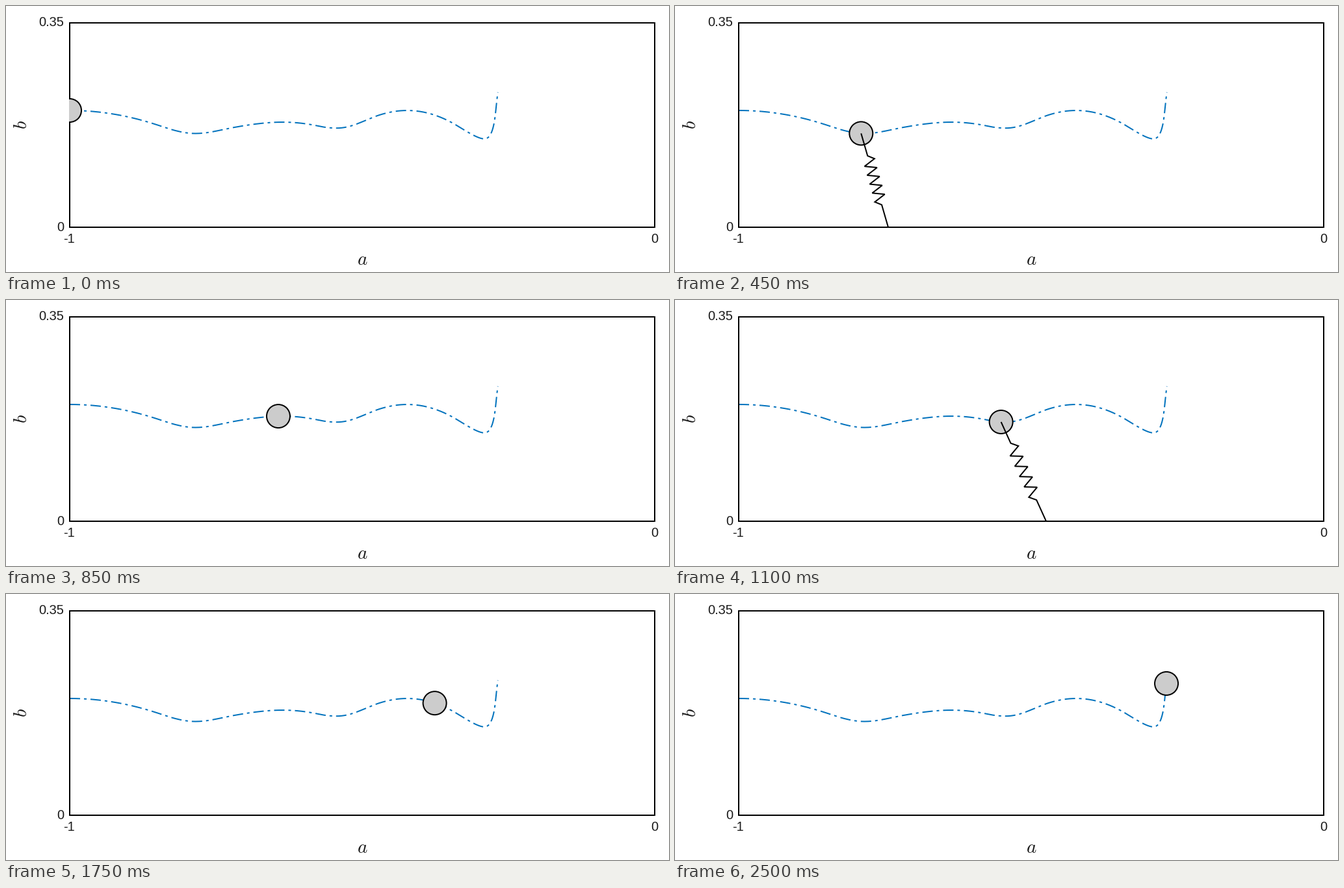
Write a matplotlib script that moves like this. It is 1020 px wide and 410 px high and loops after 2550 ms.

```python
import numpy as np
import matplotlib.pyplot as plt
from matplotlib.animation import FuncAnimation
from matplotlib.patches import Circle, Rectangle

plt.rcParams["mathtext.fontset"] = "cm"

WIDTH, HEIGHT, DPI = 1020, 410, 100
PX = 72 / DPI                      # points per pixel
FRAMES, INTERVAL = 51, 50
LEFT, RIGHT, TOP, GROUND = 98, 998, 26, 341
RADIUS, ROD, COIL, TURNS = 18, 36, 9, 10
LINE = 2 * PX
BLACK, INK, BLUE, GREY = "#000000", "#1a1a1a", "#0072bd", "#cccccc"

# Hopper states: time in frames, x, y, vx, vy (pixels, y downwards)
STATES = np.array([
    [0.00, 98.0, 161.0, 21.15, 0.00],
    [6.62, 238.0, 185.1, 21.15, 7.28],    # touchdown
    [9.25, 291.0, 196.5, 18.60, 0.00],
    [12.50, 344.5, 188.3, 16.30, -3.10],
    [16.33, 407.7, 179.6, 16.80, -1.13],  # lift-off
    [20.69, 480.9, 185.1, 16.80, 3.66],   # touchdown
    [22.50, 509.0, 188.2, 14.40, 0.00],
    [27.00, 566.0, 171.0, 11.70, -4.40],
    [29.65, 596.5, 162.7, 11.80, -1.91],  # lift-off
    [38.01, 695.1, 185.1, 11.80, 7.28],   # touchdown
    [42.40, 736.1, 204.8, 6.20, 0.00],
    [47.60, 753.2, 163.8, 1.20, -12.10],  # lift-off
    [50.55, 756.7, 132.9, 1.20, -8.86],
])
# Stance phases: touchdown time, lift-off time, foot x
STANCES = [(6.62, 16.33, 328), (20.69, 29.65, 571), (38.01, 47.60, 785)]


def position(t):
    """Cubic Hermite interpolation of the hopper's centre."""
    t = np.atleast_1d(t)
    i = np.clip(np.searchsorted(STATES[:, 0], t, side="right") - 1,
                0, len(STATES) - 2)
    a, b = STATES[i], STATES[i + 1]
    span = (b[:, 0] - a[:, 0])[:, None]
    s = (t[:, None] - a[:, :1]) / span
    return ((1 + 2 * s) * (1 - s) ** 2 * a[:, 1:3]
            + s * (1 - s) ** 2 * span * a[:, 3:]
            + s ** 2 * (3 - 2 * s) * b[:, 1:3]
            + s ** 2 * (s - 1) * span * b[:, 3:])


def spring(top, foot):
    """Leg polyline: rod, zigzag of fixed width, rod."""
    length = np.hypot(*(foot - top))
    along = (foot - top) / length
    across = np.array([along[1], -along[0]])
    steps = np.linspace(ROD, length - ROD, TURNS + 2)
    offsets = np.zeros(TURNS + 2)
    offsets[1:-1:2] = COIL
    offsets[2:-1:2] = -COIL
    coil = top + steps[:, None] * along + offsets[:, None] * across
    return np.vstack([top, coil, foot])


# The small margin keeps the pixel size from being rounded down.
fig = plt.figure(figsize=((WIDTH + 0.01) / DPI, (HEIGHT + 0.01) / DPI),
                 dpi=DPI, facecolor="white")
ax = fig.add_axes([0, 0, 1, 1])
ax.set_xlim(0, WIDTH)
ax.set_ylim(HEIGHT, 0)
ax.axis("off")

track = position(np.linspace(0, STATES[-1, 0], 600))
ax.plot(*track.T, color=BLUE, lw=LINE, ls=(0, (8, 3, 2, 3)),
        dash_capstyle="butt", zorder=1)
ax.add_patch(Rectangle((LEFT, TOP), RIGHT - LEFT, GROUND - TOP, fill=False,
                       ec=BLACK, lw=LINE, zorder=2))

for x, y, label, align in [(89, 31, "0.35", "right"), (89, 347, "0", "right"),
                           (97, 365, "-1", "center"), (998, 365, "0", "center")]:
    ax.text(x, y, label, ha=align, va="baseline", color=INK,
            family="Liberation Sans", size=20 * PX)
for x, y, label, angle in [(548, 399, "$a$", 0), (32, 183, "$b$", 90)]:
    ax.text(x, y, label, ha="center", va="baseline", color=INK, size=29 * PX,
            rotation=angle, rotation_mode="anchor")

ball = ax.add_patch(Circle((LEFT, 161), RADIUS, fc=GREY, ec=BLACK,
                           lw=LINE, zorder=3))
ball.set_clip_path(Rectangle((LEFT - 1, TOP - 1), RIGHT - LEFT + 2,
                             GROUND - TOP + 2, transform=ax.transData))
leg, = ax.plot([], [], color=BLACK, lw=LINE, zorder=4,
               solid_joinstyle="miter", solid_capstyle="butt")


def update(frame):
    centre = position(frame)[0]
    ball.center = tuple(centre)
    leg.set_data([], [])
    for touchdown, liftoff, foot_x in STANCES:
        if touchdown <= frame <= liftoff:
            leg.set_data(*spring(centre, np.array([foot_x, GROUND])).T)
    return ball, leg


anim = FuncAnimation(fig, update, frames=FRAMES, interval=INTERVAL,
                     init_func=lambda: update(0), repeat=True, repeat_delay=0)
plt.show()
```
